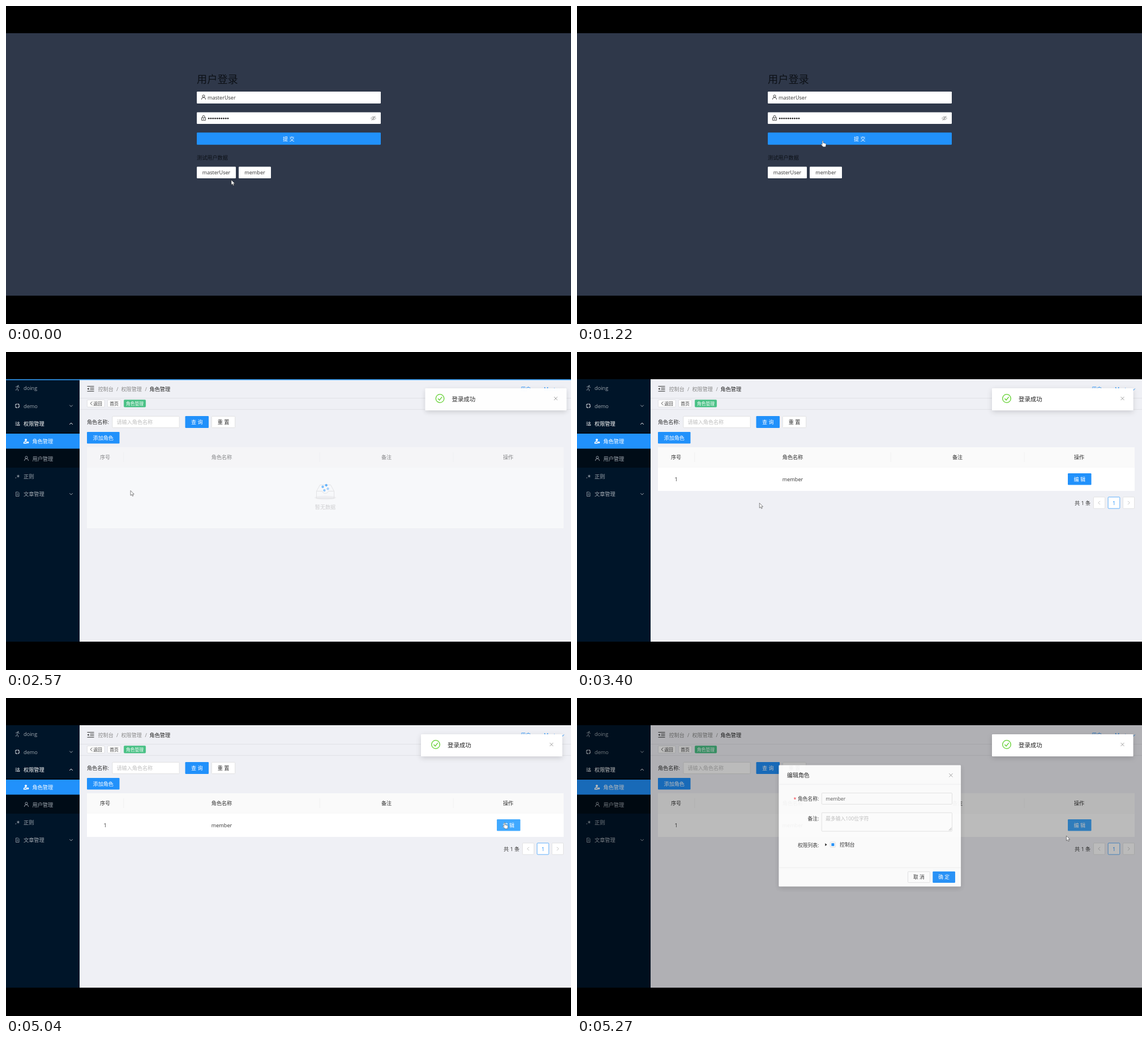
These frames come from a looping animation (998x561 px, 5300 ms). An HTML page:

```html
<!DOCTYPE html>
<html lang="zh-CN">
<head>
<meta charset="utf-8">
<style>
html, body { margin: 0; width: 100%; height: 100%; overflow: hidden; background: #000; }
svg { display: block; width: 100%; height: 100%; }
text { font-family: "Open Sans", "Noto Sans CJK SC", "Noto Sans CJK", sans-serif; white-space: pre; }
</style>
</head>
<body>
<svg id="stage" viewBox="0 0 998 561"></svg>
<script>
const LOOP = 5300, PAGE_AT = 2370, LOADING_AT = 1620, DATA_AT = 2660, MASK_AT = 5152, MODAL_AT = 5184;
const BLUE = '#2191fb', HOVER = [64, 169, 255], BASE = [33, 145, 251];
const USER = 'masterUser', ROLE = 'member';

const text = (x, y, str, fill = '#333', size = 9.1, anchor = 'start', extra = '') =>
  `<text x="${x}" y="${y + size * 0.37}" fill="${fill}" font-size="${size}" text-anchor="${anchor}" ${extra}>${str}</text>`;
const mid = (x, y, str, fill, size) => text(x, y, str, fill, size, 'middle');
const rect = (x, y, w, h, fill, extra = '') =>
  `<rect x="${x}" y="${y}" width="${w}" height="${h}" fill="${fill}" ${extra}/>`;
const line = (d, stroke, width = 0.8, extra = '') =>
  `<path d="${d}" fill="none" stroke="${stroke}" stroke-width="${width}" ${extra}/>`;
const dot = (x, y, r, fill, extra = '') => `<circle cx="${x}" cy="${y}" r="${r}" fill="${fill}" ${extra}/>`;
const box = (x, y, w, h, stroke = '#d9d9d9', fill = '#fff') =>
  rect(x + 0.4, y + 0.4, w - 0.8, h - 0.8, fill, `rx="1.3" stroke="${stroke}" stroke-width=".7"`);
const button = (x, y, w, h, label, fill = BLUE, color = '#fff', extra = '', size = 9.1) =>
  rect(x, y, w, h, fill, 'rx="1.3" ' + extra) + mid(x + w / 2, y + h / 2, label, color, size);
const group = (id, body, extra = '') => `<g id="${id}" ${extra}>${body}</g>`;

const userIcon = (x, y, c) => dot(x, y - 2, 2.1, 'none', `stroke="${c}" stroke-width=".9"`) +
  line(`M${x - 3.6} ${y + 4}a3.6 3.9 0 0 1 7.2 0`, c, 0.9);
const cross = (x, y, r, c) =>
  line(`M${x - r} ${y - r}l${2 * r} ${2 * r}m0 ${-2 * r}l${-2 * r} ${2 * r}`, c);
const chevron = (x, y, dir, c) => line(`M${x - 2.7} ${y - 1.4 * dir}l2.7 ${2.8 * dir}l2.7 ${-2.8 * dir}`, c, 1);
const angle = (x, y, dir, c) => line(`M${x - 1.6 * dir} ${y - 3}l${3.4 * dir} 3l${-3.4 * dir} 3`, c);

function login() {
  let dots = '';
  for (let i = 0; i < 10; i++) dots += dot(358.2 + i * 3.75, 198.3, 1.35, '#222');
  return rect(0, 48, 998, 463, '#2f384a') +
    text(337, 129, '用户登录', '#0d1117', 18.2) +
    rect(337, 151, 325, 21, '#fff', 'rx="1.3"') + userIcon(349, 161, '#333') + text(356, 162, USER) +
    rect(337, 187.5, 325, 20.5, '#fff', 'rx="1.3"') +
    line('M345.6 197h6.8v4.6h-6.8zM347 197v-1.7a2 2 0 0 1 4 0v1.7M348 199.3h2', '#333', 0.9) + dots +
    line('M644.5 198q4.5-5.6 9 0q-4.500 5.600-9 0M645.600 202l7-8', '#888') + dot(649, 198, 1.3, 'none', 'stroke="#888" stroke-width=".7"') +
    rect(337, 223.5, 325, 21, BLUE, 'id="wave" rx="1.3"') +
    rect(337, 223.5, 325, 21, BLUE, 'id="submit" rx="1.3"') +
    group('spinner', line('M480 234a3.500 3.500 0 0 0 3.500 3.500', '#fff', 0.9)) +
    group('label', mid(499.3, 234.5, '提 交', '#fff')) +
    text(337, 268, '测试用户数据', '#0d1117', 9.15) +
    button(337, 283.5, 69, 20.5, USER, '#fff', '#333') +
    button(411, 283.5, 57, 20.5, ROLE, '#fff', '#333');
}

function sidebar() {
  const dim = '#a0a8b0';
  const item = (y, label, x = 31, c = dim) => text(x, y, label, c, 9.2);
  return rect(0, 48, 130, 463, '#001529') + rect(0, 142, 130, 62, '#000c17') +
    rect(0, 144, 130, 26.500, BLUE) +
    line('M17 62l3-2l2 2l2 .4M20.500 60.500l-1 4l2 1.500v3M19.500 64.500l-1 2.500h-2', dim) + dot(21.6, 59.5, 0.9, dim) + item(64, 'doing') +
    dot(20, 95, 3.4, 'none', `stroke="${dim}" stroke-width="1.700" stroke-dasharray="4.300 1.040"`) + item(95.500, 'demo') + chevron(115, 95, 1, dim) +
    line('M16.500 124h3M16.500 126.500h3M16.500 129h3', '#fff') + dot(22, 124.8, 1.3, 'none', 'stroke="#fff" stroke-width=".8"') +
    line('M20 129.500v-1.500q2-2 4 0v1.500z', '#fff') + item(126.500, '权限管理', 31, '#fff') + chevron(115, 126.500, -1, '#fff') +
    dot(35, 155, 2, '#fff') + line('M31.500 161v-1.500q3-3 4.500-1v2.500z', '#fff', 1.3) + dot(38.6, 159.6, 1.8, '#fff') + item(157.500, '角色管理', 46.500, '#fff') +
    userIcon(36, 188, dim) + item(188.500, '用户管理', 46.500) +
    dot(17.3, 222, 0.7, dim) + line('M21.500 216.500v5M19.300 217.700l4.400 2.600M23.700 217.700l-4.400 2.600', dim) + item(219.500, '正则') +
    line('M17.500 247h4l1.500 1.500v6h-5.500zM19 250h2.500M19 252h2.500', dim) + item(251, '文章管理') + chevron(115, 250.500, 1, dim);
}

function header() {
  const tag = (x, w, label, fill, color, stroke) => box(x, 84, w, 13.500, stroke, fill) + mid(x + w / 2, 90.800, label, color, 7.8);
  return rect(130, 48, 868, 463, '#eff0f5') +
    line('M130 81.500H998M130 101.300H998', '#e0e1e6', 1) +
    line('M143.500 60.500h12M148.500 63.500h7M148.500 66.300h7M143.500 69.300h12', '#333', 1.1) +
    `<path d="M143.500 65l2.800-2v4z" fill="#333"/>` +
    text(162.500, 66, '控制台', '#888') + text(195, 66, '/', '#888') + text(203.500, 66, '权限管理', '#888') +
    text(245.500, 66, '/', '#888') + text(253.500, 66, '角色管理', '#222', 9.2) +
    text(909, 66, '用户', BLUE) + text(950, 66, 'Master', BLUE) + chevron(983, 66, 1, BLUE) +
    tag(143, 31.500, '', '#fff', '#333', '#d5d6da') + line('M152.500 87.500l-3.500 3.200l3.500 3.200', '#333') + text(154.300, 90.800, '返回', '#333', 7.8) +
    tag(179, 24, '首页', '#fff', '#333', '#d5d6da') + tag(208, 39, '角色管理', '#49c185', '#fff', '#49c185');
}

function filters() {
  return text(143, 124, '角色名称:', '#333') + box(187.500, 113, 119, 21) + text(195.500, 124, '请输入角色名称', '#bfbfbf') +
    button(316.500, 113, 41.500, 21, '查 询') + box(363, 113, 42, 21) + mid(384, 124, '重 置', '#333') +
    button(143, 141, 57.500, 20.500, '添加角色');
}

function table() {
  const heads = [[175, '序号'], [381, '角色名称'], [672, '备注'], [887, '操作']];
  const empty = rect(143, 204, 842, 107, '#fff') +
    `<ellipse cx="564" cy="257" rx="19" ry="3.500" fill="#eee"/>` +
    line('M548.500 245.500l6-11h19l6 11v12.500h-31zM548.500 245.500h10q1 4 5.500 4t5.500-4h10', '#cfcfcf', 0.8) +
    mid(564, 273.500, '暂无数据', '#b5b5b5');
  const data = rect(143, 204, 842, 41, '#fff') + mid(175, 225, '1') + mid(381, 225, ROLE) +
    button(867, 214, 41.500, 20.500, '编 辑', BLUE, '#fff', 'id="edit"') +
    text(879, 266.500, '共 1 条') + box(912, 255.500, 21, 21) + box(937.700, 255.500, 21.500, 21, BLUE) + box(964, 255.500, 21, 21) +
    angle(922.500, 266, -1, '#bbb') + angle(974.500, 266, 1, '#bbb') + mid(948.500, 266.500, '1', BLUE);
  let spin = '';
  for (let i = 0; i < 4; i++)
    spin += dot(564 + 4.800 * Math.cos(i * Math.PI / 2), 239.500 + 4.800 * Math.sin(i * Math.PI / 2), 2.2, '#1890ff', `opacity="${0.35 + i * 0.1}"`);
  return group('table', rect(143, 168, 842, 36, '#fafafa') +
    line('M143 204.300H985M207.700 177v17M554.300 177v17M790 177v17', '#efefef', 0.8) +
    heads.map(([x, s]) => mid(x, 186, s)).join('') + group('empty', empty) + group('data', data)) + group('spin', spin);
}

const notice = () => group('notice',
  rect(733, 64, 249.500, 39, '#fff', 'rx="1.3" filter="url(#shadow)"') +
  dot(759, 82, 7.3, 'none', 'stroke="#5fd02c" stroke-width="1.300"') +
  line('M755.500 82l2.600 2.900l4.600-5.700', '#5fd02c', 1.3) +
  text(780, 83, '登录成功', '#222', 10.4) + cross(963.5, 82, 3, '#888'));

function modal() {
  const size = 8.7;
  const label = (y, s) => text(429.500, y, s, '#333', size, 'end');
  return group('modal', rect(359, 119, 320, 213, '#fff', 'rx="1.3" filter="url(#shadow)"') +
    line('M359 152.500H679M359 299H679', '#eee', 0.7) +
    text(373.500, 136.500, '编辑角色', '#222', 9.9) + cross(661.5, 136.7, 3.1, '#888') +
    text(385, 179, '*', '#f5222d', size) + label(178, '角色名称:') + box(434, 167.500, 230, 20.500) + text(441.500, 178, ROLE, '#555', size) +
    label(212.500, '备注:') + box(434, 202, 230, 33.500) + text(441.500, 212.500, '最多输入100位字符', '#bfbfbf', size) +
    line('M658 233.500l4.500-4.500M660.500 233.500l2-2', '#777', 0.6) +
    label(260, '权限列表:') + `<path d="M440.500 256l3.200 2.500l-3.200 2.500z" fill="#222"/>` +
    box(449, 253.500, 10, 10) + rect(451.500, 256, 5, 5, BLUE) + text(466, 259, '控制台', '#333', 8.9) +
    box(585.500, 305.500, 39.500, 20) + mid(605.300, 315.700, '取 消', '#333', size) +
    button(629.500, 305.500, 39.500, 20, '确 定', BLUE, '#fff', '', size));
}

const cursor = () => group('cursor',
  group('arrow', `<path d="M0 0v8.600l2-1.800l1.400 3l1.500-.7l-1.400-2.800h2.700z" fill="#fff" stroke="#333" stroke-width=".6"/>`) +
  group('hand', `<path d="M1.200-.5q1-1 1.700 0v3.500l4 1q1.300.5 1 2l-.8 4h-4.300l-3.800-4.300q0-1.300 1.200-.8l1 1z" fill="#fff" stroke="#333" stroke-width=".5"/>`));

document.getElementById('stage').innerHTML =
  `<defs><filter id="shadow" x="-20%" y="-60%" width="140%" height="240%">
    <feDropShadow dx="0" dy="3" stdDeviation="5" flood-opacity=".15"/></filter>
    <clipPath id="screen"><rect y="48" width="998" height="463"/></clipPath></defs>` +
  rect(0, 0, 998, 561, '#000') +
  `<g clip-path="url(#screen)">` + group('login', login()) +
  group('page', header() + sidebar() + filters() + table() + rect(0, 48, 995, 1.6, '#3298ef', 'id="bar"') +
    rect(0, 48, 998, 463, '#000', 'id="mask"') + modal() + notice()) + cursor() + '</g>';

const el = {};
document.querySelectorAll('[id]').forEach(n => el[n.id] = n);
const set = (id, name, value) => el[id].setAttribute(name, value);
const show = (id, on) => set(id, 'display', on ? 'inline' : 'none');

const progress = (t, from, span) => Math.min(1, Math.max(0, (t - from) / span));
const easeInOut = p => p < 0.5 ? 4 * p ** 3 : 1 - 4 * (1 - p) ** 3;
const bezier = (u, a, b) => 3 * (1 - u) ** 2 * u * a + 3 * (1 - u) * u * u * b + u ** 3;
function easeOutCirc(p) {
  let lo = 0, hi = 1;
  for (let i = 0; i < 20; i++) {
    const u = (lo + hi) / 2;
    if (bezier(u, 0.08, 0.17) < p) lo = u; else hi = u;
  }
  return bezier(lo, 0.82, 1);
}
const tint = p => `rgb(${BASE.map((c, i) => Math.round(c + (HOVER[i] - c) * p))})`;

// time, x, y
const PATH = [[0, 398, 307], [350, 400, 303], [600, 408, 287], [1000, 426, 256], [1220, 432, 238.5], [1450, 438, 235],
  [1850, 440, 236], [2310, 457, 280], [2450, 330, 262], [2570, 220, 244.500], [3000, 224, 250], [3300, 270, 262],
  [3860, 560, 287], [4120, 780, 280], [4400, 956, 198], [4470, 935, 201], [4850, 882, 220], [5140, 877, 221],
  [5200, 871.500, 231], [5270, 864.500, 243], [5300, 862, 246]];
function pointer(t) {
  const i = PATH.findIndex(k => k[0] > t), [t0, x0, y0] = PATH[i - 1], [t1, x1, y1] = PATH[i];
  const p = (t - t0) / (t1 - t0);
  return [x0 + (x1 - x0) * p, y0 + (y1 - y0) * p];
}
const inside = (x, y, l, t, r, b) => x > l && x < r && y > t && y < b;

function draw(t) {
  const onPage = t >= PAGE_AT, loading = t >= LOADING_AT, loaded = t >= DATA_AT;
  show('login', !onPage);
  show('page', onPage);

  set('submit', 'fill', loading ? '#87c9fb' : tint(progress(t, 1220, 300)));
  const shift = easeInOut(progress(t, LOADING_AT, 250));
  set('label', 'transform', `translate(${7.2 * shift} 0)`);
  show('spinner', loading);
  set('spinner', 'transform', `rotate(${(t - 2310) * 0.36} 483.5 234)`);
  const wave = progress(t, 1560, 400);
  set('wave', 'stroke', '#2191fb');
  set('wave', 'stroke-width', wave * 4);
  set('wave', 'stroke-opacity', 0.25 * (1 - progress(t, 1560, 800)));

  const slide = easeInOut(progress(t, PAGE_AT, 250));
  set('notice', 'transform', `translate(${(1 - slide) * 250} 0)`);
  set('notice', 'opacity', slide);
  set('bar', 'width', 600 + 398 * progress(t, PAGE_AT, 200));
  set('bar', 'opacity', 1 - progress(t, 2600, 120));
  set('table', 'opacity', 0.55 + 0.45 * progress(t, DATA_AT, 250));
  show('empty', !loaded);
  show('data', loaded);
  show('spin', !loaded);
  set('spin', 'transform', `rotate(${(t - 2570) * 0.3 + 20} 564 239.5)`);

  const [x, y] = pointer(t);
  set('edit', 'fill', tint(progress(t, 4800, 200)));
  set('mask', 'opacity', 0.45 * progress(t, MASK_AT, 200));
  const grow = easeOutCirc(progress(t, MODAL_AT, 200));
  const scale = (0.2 + 0.8 * grow) / 0.947;
  show('modal', t >= MODAL_AT);
  set('modal', 'opacity', grow);
  set('modal', 'transform', `translate(877 221) scale(${scale}) translate(-877 -221)`);

  const hot = onPage ? t < MASK_AT && inside(x, y, 867, 214, 908, 235)
    : !loading && (inside(x, y, 337, 223, 662, 245) || inside(x, y, 337, 283, 406, 304) || inside(x, y, 411, 283, 468, 304));
  show('hand', hot);
  show('arrow', !hot);
  set('cursor', 'transform', `translate(${x} ${y})`);
}

const start = performance.now();
function tick() {
  draw((performance.now() - start) % LOOP);
  requestAnimationFrame(tick);
}
tick();
</script>
</body>
</html>
```
